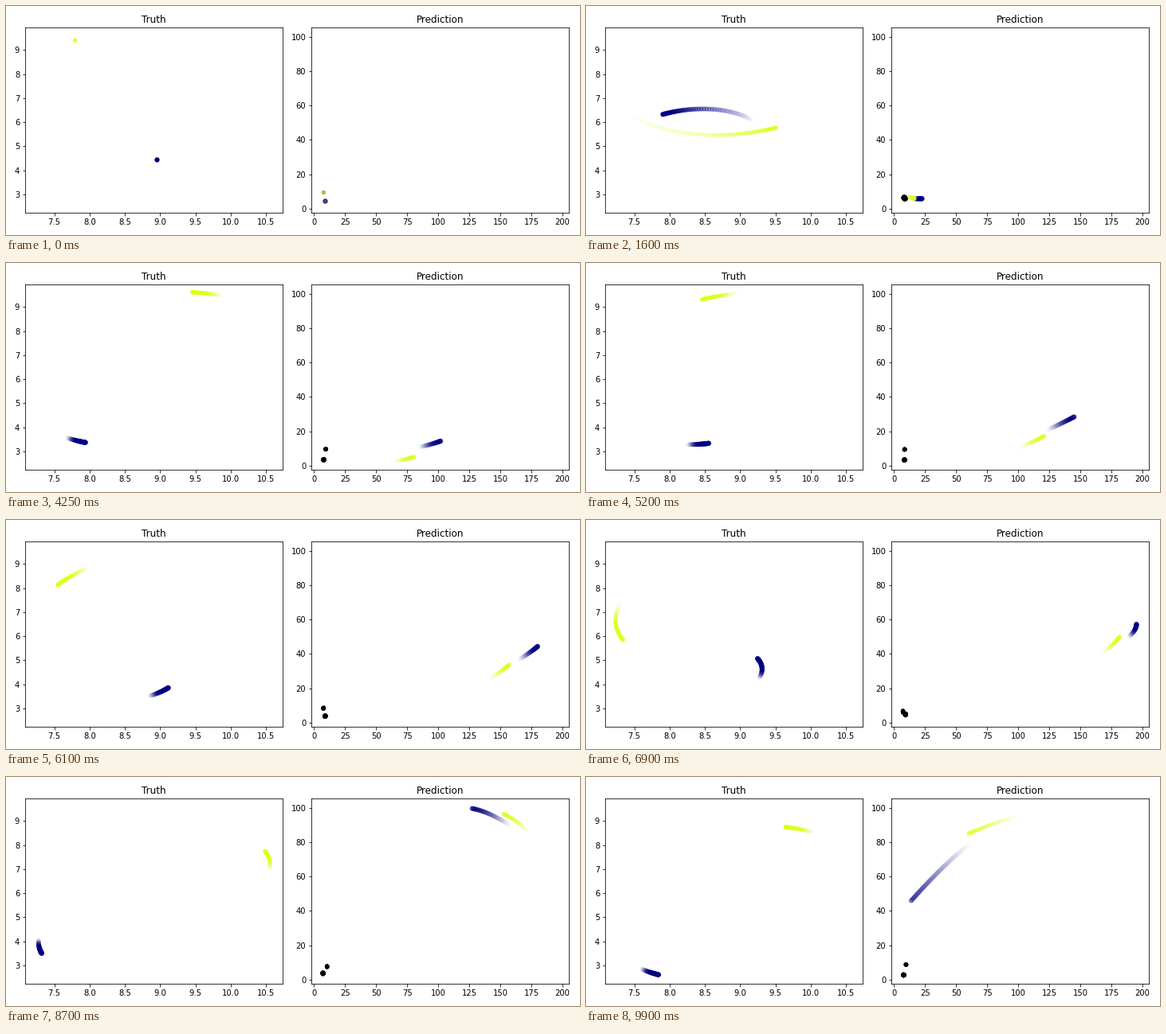
A matplotlib script for the animation above (9950 ms loop, 720 by 288 pixels).

```python
import numpy as np
import matplotlib.pyplot as plt
from matplotlib.animation import FuncAnimation

W, H, DPI = 720, 288, 72
FRAMES, INTERVAL = 199, 50
SUB = 5       # simulation steps per frame
TRAIL = 50    # dots in a full trail

NAVY, LIME, BLACK = (0, 0, 0.5), (0.87, 1, 0.1), (0, 0, 0)
SIZES = (28, 19)

time = np.arange((FRAMES - 1) * SUB + 1) / SUB   # in frames


def kepler_orbits(t):
    """Paths of the heavy and the light body around their drifting centre."""
    a, e, peri = 3.743, 0.7164, np.radians(257)
    mean = np.radians(-85.1 + 3.086 * t)
    mean = (mean + np.pi) % (2 * np.pi) - np.pi
    ecc = mean + e * np.sin(mean)
    for _ in range(60):
        ecc -= (ecc - e * np.sin(ecc) - mean) / (1 - e * np.cos(ecc))
    u = a * (np.cos(ecc) - e)
    v = a * np.sqrt(1 - e * e) * np.sin(ecc)
    c, s = np.cos(peri), np.sin(peri)
    rel = np.column_stack([c * u - s * v, s * u + c * v])
    centre = np.column_stack([8.51 + 0.00008 * t, 6.342 - 0.00704 * t])
    return centre - 0.38 * rel, centre + 0.62 * rel


def smooth_path(t, *keys):
    """Cubic Hermite curve through key points (time, x, y)."""
    keys = np.array(keys, float)
    k, pts = keys[:, 0], keys[:, 1:]
    slope = np.gradient(pts, k, axis=0, edge_order=2)
    i = np.clip(np.searchsorted(k, t, side="right") - 1, 0, len(k) - 2)
    h = (k[i + 1] - k[i])[:, None]
    s = (t - k[i])[:, None] / h
    return ((1 + 2 * s) * (1 - s) ** 2 * pts[i] + s * (1 - s) ** 2 * h * slope[i]
            + s * s * (3 - 2 * s) * pts[i + 1] + s * s * (s - 1) * h * slope[i + 1])


truth = kepler_orbits(time)
predicted = (
    smooth_path(time, (0, 8.95, 4.44), (20, 14.2, 5.5), (52, 45, 6.8),
                (85, 102, 14.3), (122, 180, 44.4), (138, 195.1, 57.3),
                (160, 171, 83.7), (180, 103, 98), (198, 14, 46)),
    smooth_path(time, (0, 7.81, 9.42), (32, 16.5, 5.9), (52, 32.5, 3.4),
                (85, 80.5, 5), (122, 157, 33.6), (151, 188.5, 64.5),
                (180, 134.5, 99), (198, 60, 85)),
)

fig, (left, right) = plt.subplots(1, 2, figsize=(W / DPI, H / DPI), dpi=DPI)
left.set(title="Truth", xlim=(7.088, 10.730), ylim=(2.232, 9.947))
right.set(title="Prediction", xlim=(-1.92, 204.8), ylim=(-2.5, 105.5))
fig.tight_layout()


class Trail:
    def __init__(self, ax, path, color, size, strength):
        self.path = path
        self.rgba = np.ones((TRAIL, 4))
        self.rgba[:, :3] = color
        self.rgba[:, 3] = strength * np.linspace(0, 1, TRAIL) ** 2
        self.dots = ax.scatter(path[:1, 0], path[:1, 1], s=size, color=[color])

    def show(self, step):
        part = self.path[max(0, step - TRAIL + 1):step + 1]
        colors = self.rgba[-len(part):]
        self.dots.set_offsets(part)
        self.dots.set_facecolor(colors)
        self.dots.set_edgecolor(colors)


trails = []
for ax, paths, colors, strength in (
        (left, truth, (NAVY, LIME), 1),
        (right, truth, (BLACK, BLACK), 0.45),
        (right, predicted, (NAVY, LIME), 0.45)):
    for path, color, size in zip(paths, colors, SIZES):
        trails.append(Trail(ax, path, color, size, strength))


def update(frame):
    for trail in trails:
        trail.show(frame * SUB)
    return [trail.dots for trail in trails]


anim = FuncAnimation(fig, update, frames=FRAMES, interval=INTERVAL, repeat=True)
plt.show()
```
